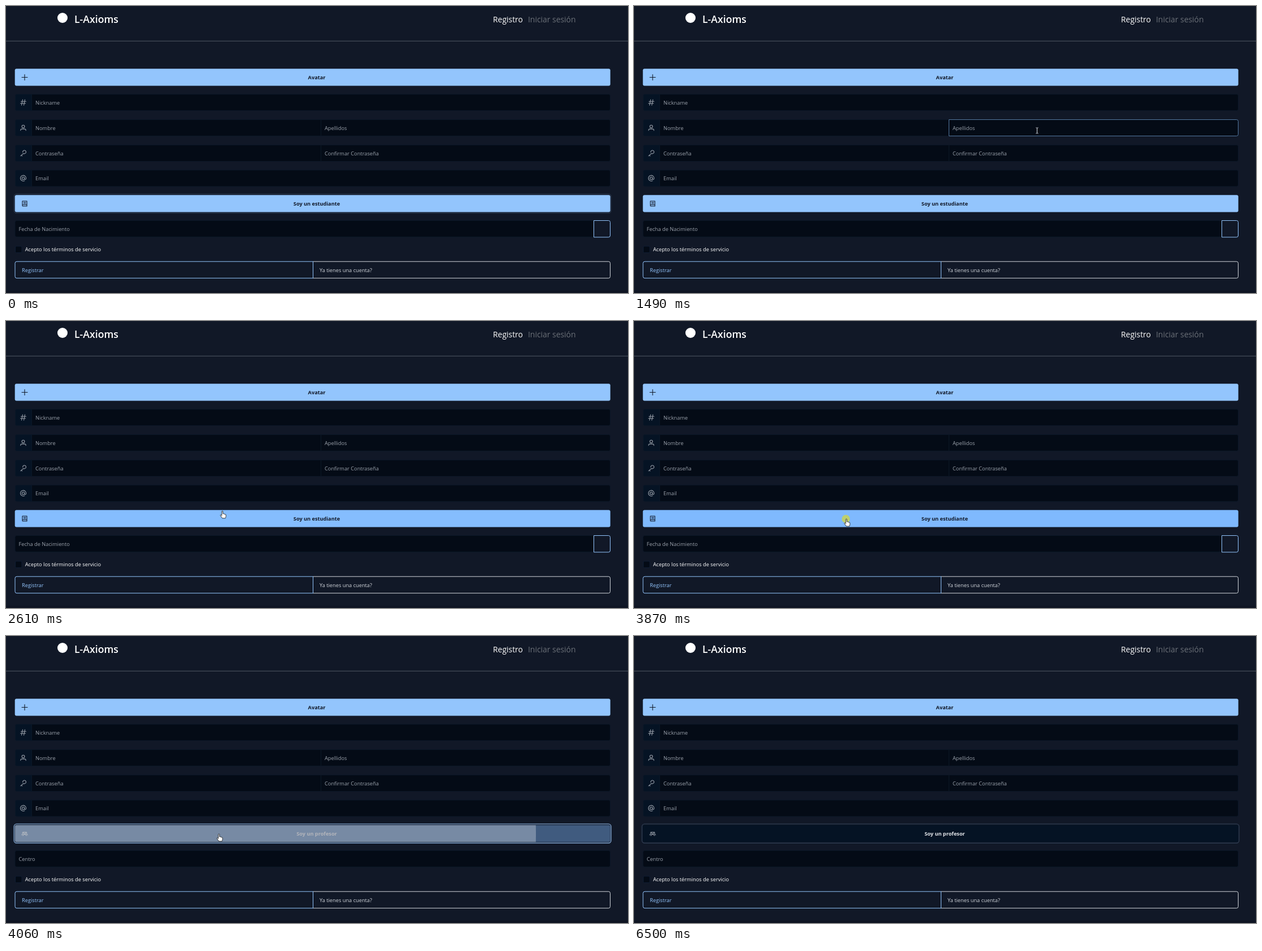
Write an HTML page that moves like this. It is 1101 px wide and 509 px high and loops after 6.52 s.

```html
<!DOCTYPE html>
<html lang="es">
<head>
<meta charset="utf-8">
<title>Registro</title>
<style>
html, body { margin: 0; width: 100%; height: 100%; overflow: hidden; background: #111827; }
svg { display: block; width: 100vw; height: 100vh; }
text { font: 9.25px "Open Sans", "Noto Sans", sans-serif; fill: #9aa1ab; }
.bold { font-weight: 700; font-size: 9.2px; text-anchor: middle; fill: #111827; }
.nav { font-size: 13.9px; }
.brand { font-size: 17.7px; font-weight: 600; fill: #fff; }
.field { fill: #040b16; stroke: #0b1727; }
.addon { fill: #051324; stroke: #0b1727; }
.hover { fill: none; stroke: #53779f; opacity: 0; }
.icon { fill: none; stroke: #9aa1ab; stroke-width: 1.1; stroke-linecap: round; stroke-linejoin: round; }
</style>
</head>
<body>
<svg id="stage" viewBox="0 0 1101 509" preserveAspectRatio="none"></svg>
<script>
const LOOP = 6520, PRESS = 3890, TOGGLE = 3985;
const svg = document.getElementById('stage');

function add(tag, attrs, text) {
  const el = document.createElementNS('http://www.w3.org/2000/svg', tag);
  for (const k in attrs) el.setAttribute(k, attrs[k]);
  if (text) el.textContent = text;
  svg.appendChild(el);
  return el;
}
const set = (el, k, v) => el.setAttribute(k, v);
const label = (x, y, text, attrs) => add('text', { x, y, ...attrs }, text);
const icon = (x, y, d, attrs) =>
  add('path', { d, class: 'icon', transform: `translate(${x} ${y})`, ...attrs });
const box = (x, y, w, h, attrs) => add('rect', { x, y, width: w, height: h, rx: 3, ...attrs });

// Box with square corners on the sides that touch a neighbour
function joined(x, y, w, h, l, r, attrs) {
  const a = l ? 3 : 0, b = r ? 3 : 0;
  return add('path', {
    d: `M${x + a} ${y}h${w - a - b}q${b} 0 ${b} ${b}v${h - 2 * b}q0 ${b} ${-b} ${b}` +
       `h${a + b - w}q${-a} 0 ${-a} ${-a}v${2 * a - h}q0 ${-a} ${a} ${-a}z`, ...attrs });
}

const hovers = {};
function field(name, x, y, w, text, l, r) {
  const shape = cls => joined(x + .5, y + .5, w - 1, 29, l, r, { class: cls });
  const parts = [shape('field'), label(x + 7, y + 18.6, text)];
  hovers[name] = shape('hover');
  return parts;
}
const addon = (y, d) => {
  joined(16.5, y + .5, 29, 29, true, false, { class: 'addon' });
  icon(30.5, y + 15, d);
};

// Header
add('rect', { width: 1101, height: 509, fill: '#111827' });
add('rect', { y: 505, width: 1101, height: 4, fill: '#0e1422' });
add('rect', { y: 61.6, width: 1101, height: 1.3, fill: '#424b57' });
add('circle', { cx: 100, cy: 21, r: 9, fill: '#fff' });
label(121, 30, 'L-Axioms', { class: 'brand' });
label(862, 29, 'Registro', { class: 'nav', style: 'fill:#fff' });
label(924, 29, 'Iniciar sesión', { class: 'nav', style: 'fill:#6b7078' });

// Form
box(15.7, 111.2, 1054, 30.3, { fill: '#93c5fd' });
icon(33, 126.5, 'M-5 0H5M0-5V5', { style: 'stroke:#111827' });
label(550, 130, 'Avatar', { class: 'bold' });

addon(156, 'M-4-1.8H5M-5 1.8H4M-1-5L-3 5M3-5L1 5');
field('nick', 45, 156, 1025, 'Nickname', false, true);
addon(201, 'M-2.4-2.3a2.4 2.4 0 1 0 4.8 0a2.4 2.4 0 1 0-4.8 0M-4.6 4.7v-.6q0-2 2-2h5.2q2 0 2 2v.6');
field('name', 45, 201, 513, 'Nombre', false, false);
field('surname', 557, 201, 513, 'Apellidos', false, true);
addon(246, 'M-.8-1.6a2.9 2.9 0 1 1 2.4 2.4L-.2.9L-4.6 4.8M-3.2 3.5l1.3 1.3');
field('pass', 45, 246, 513, 'Contraseña', false, false);
field('confirm', 557, 246, 513, 'Confirmar Contraseña', false, true);
addon(290.5, 'M2.2 0a2.2 2.2 0 1 1-4.4 0a2.2 2.2 0 1 1 4.4 0v.8q0 1.4 1.4 1.4T5 .6V0A5 5 0 1 0 2.4 4.3');
field('email', 45, 290.5, 1025, 'Email', false, true);

// Role switch
const ring = box(14.2, 333.4, 1056.8, 33.8, { rx: 4.5, fill: 'none', 'stroke-width': 1.4, stroke: '#7fa3cc' });
const role = box(15.7, 335.2, 1054, 30.3, {});
const book = icon(33, 350.5, 'M-4-4.5H4V4.5H-3q-1 0-1-1zM-4 3q0-1 1-1H4M-1.6-2.2H2M-1.6-.2H2', { style: 'stroke:#111827' });
const people = icon(33, 350.5, 'M-1.7-1a1.7 1.7 0 1 0 3.4 0a1.7 1.7 0 1 0-3.4 0M-3 3.6q0-2.4 3-2.4t3 2.4M-2.2-2.6a1.4 1.4 0 0 0-1.2 2.3M-3.6.8q-1.4.5-1.4 1.7M2.2-2.6a1.4 1.4 0 0 1 1.2 2.3M3.6.8q1.4.5 1.4 1.7');
const roleText = label(550, 354.3, '', { class: 'bold' });
const clip = add('clipPath', { id: 'role' });
clip.appendChild(box(15.7, 335.2, 1054, 30.3, {}));
const ripple = add('circle', { cx: 375, cy: 351, fill: '#fff', 'clip-path': 'url(#role)' });

const dateParts = field('date', 15.5, 380, 1025.5, 'Fecha de Nacimiento', true, false);
dateParts.push(joined(1040.5, 380.5, 29, 29.5, false, true, { fill: '#111827', stroke: '#93c5fd' }));
const centroParts = field('centro', 15.5, 380, 1054.5, 'Centro', true, true);

box(16.5, 426, 11.5, 11.5, { rx: 2, class: 'field', style: 'stroke:#0f1d33' });
label(33.7, 435.2, 'Acepto los términos de servicio', { style: 'fill:#fff' });
joined(543.5, 453.2, 526, 29.5, false, true, { fill: 'none', stroke: '#d1d5db' });
joined(16, 453.2, 527.5, 29.5, true, false, { fill: 'none', stroke: '#93c5fd' });
label(28, 471.6, 'Registrar', { style: 'fill:#93c5fd' });
label(555, 471.6, 'Ya tienes una cuenta?', { style: 'fill:#d1d5db' });

// Pointer, drawn with its hot spot at 0,0
const spot = add('circle', { cx: 375, cy: 351, r: 7.2, fill: '#c8d255' });
const pointer = {
  beam: add('path', { d: 'M-2-5H-.6L0-4.4L.6-5H2M0-4.4V4.4M-2 5H-.6L0 4.4L.6 5H2', fill: 'none', stroke: '#dfe3e8' }),
  hand: add('path', { d: 'M-.6 1.2q0-1.2 1-1.2t1 1.2V5q1.7-.5 2 .6q1.3-.4 1.7.5q1.6-.2 1.6 1.2V9.6q0 1.6-1 3.4H.3L-2.8 8.6q-.8-1.3 0-1.6q.8-.3 2.2 1.4z', fill: '#fff', stroke: '#111', 'stroke-width': .8 }),
  arrow: add('path', { d: 'M0 0V11.5L2.7 9L4.4 13L6.2 12.2L4.5 8.4H8z', fill: '#fff', stroke: '#111', 'stroke-width': .8 })
};

const path = [
  [870, 1030, 384], [1130, 925, 246], [1450, 735, 216], [1650, 630, 240], [1800, 515, 262],
  [2130, 394.5, 306.5], [2430, 387, 326], [2530, 386, 330], [2780, 375.5, 351],
  [3880, 375.5, 351], [4060, 376.5, 351], [5310, 377.5, 351],
  [5500, 520, 374], [5860, 1030, 390], [5950, 1101, 418]
];
const spans = [
  ['date', 740, 900], ['email', 980, 1070], ['confirm', 1075, 1140], ['surname', 1150, 1590],
  ['confirm', 1660, 1740], ['pass', 1805, 2020], ['email', 2020, 2420], ['centro', 5430, 5880]
];
const rows = [[201, 231], [246, 276], [290, 321], [380, 410]];

const clamp = v => Math.max(0, Math.min(1, v));
const ease = v => 1 - (1 - v) ** 2;
const ramp = (t, start, len = 200) => ease(clamp((t - start) / len));
const span = (t, on, off) => ramp(t, on) * (1 - ramp(t, off));
const mix = (a, b, k) => a.map((v, i) => v + (b[i] - v) * k);
const rgb = c => `rgb(${c.map(Math.round)})`;
const show = (el, on) => set(el, 'visibility', on ? 'visible' : 'hidden');

function locate(t) {
  const i = path.findIndex(p => p[0] > t);
  if (i < 1) return null;
  const [a, b] = [path[i - 1], path[i]];
  return mix(a, b, (t - a[0]) / (b[0] - a[0])).slice(1);
}

function movePointer(t) {
  const at = locate(t);
  let kind = '';
  if (at) {
    const [x, y] = at;
    kind = y >= 335 && y <= 366 ? 'hand'
      : x < 1070 && rows.some(r => y >= r[0] && y <= r[1]) ? 'beam' : 'arrow';
    set(pointer[kind], 'transform', `translate(${x} ${y})`);
  }
  for (const k in pointer) show(pointer[k], k === kind);
  set(spot, 'opacity', t < 3865 ? 0 : .85 * (1 - clamp((t - PRESS) / 110)));
}

function drawRole(t) {
  const teacher = t >= TOGGLE, turn = ramp(t, TOGGLE);
  const over = Math.max(span(t, 900, 980), span(t, 2520, LOOP));
  const student = mix([147, 197, 253], [127, 185, 254], over);
  const dark = mix([25, 33, 47], [5, 19, 36], ramp(t, 5410));
  set(role, 'fill', rgb(mix(student, dark, turn)));
  roleText.textContent = teacher ? 'Soy un profesor' : 'Soy un estudiante';
  roleText.style.fill = rgb(mix([17, 24, 39], [229, 231, 235], turn));
  show(book, !teacher);
  show(people, teacher);

  const p = clamp((t - PRESS) / 400);
  set(ripple, 'r', 1317 * p);
  set(ripple, 'opacity', .5 * (1 - p));
  const focus = ramp(t, PRESS) * (1 - .75 * clamp((t - 6440) / 60));
  set(ring, 'opacity', t < 40 ? .2 * (1 - t / 40) : focus);

  dateParts.forEach(el => show(el, !teacher));
  centroParts.forEach(el => show(el, teacher));
}

function draw(t) {
  for (const k in hovers) hovers[k].style.opacity =
    Math.max(0, ...spans.filter(s => s[0] === k).map(s => span(t, s[1], s[2])));
  drawRole(t);
  movePointer(t);
}

const start = performance.now();
function tick() {
  draw((performance.now() - start) % LOOP);
  requestAnimationFrame(tick);
}
tick();
</script>
</body>
</html>
```
